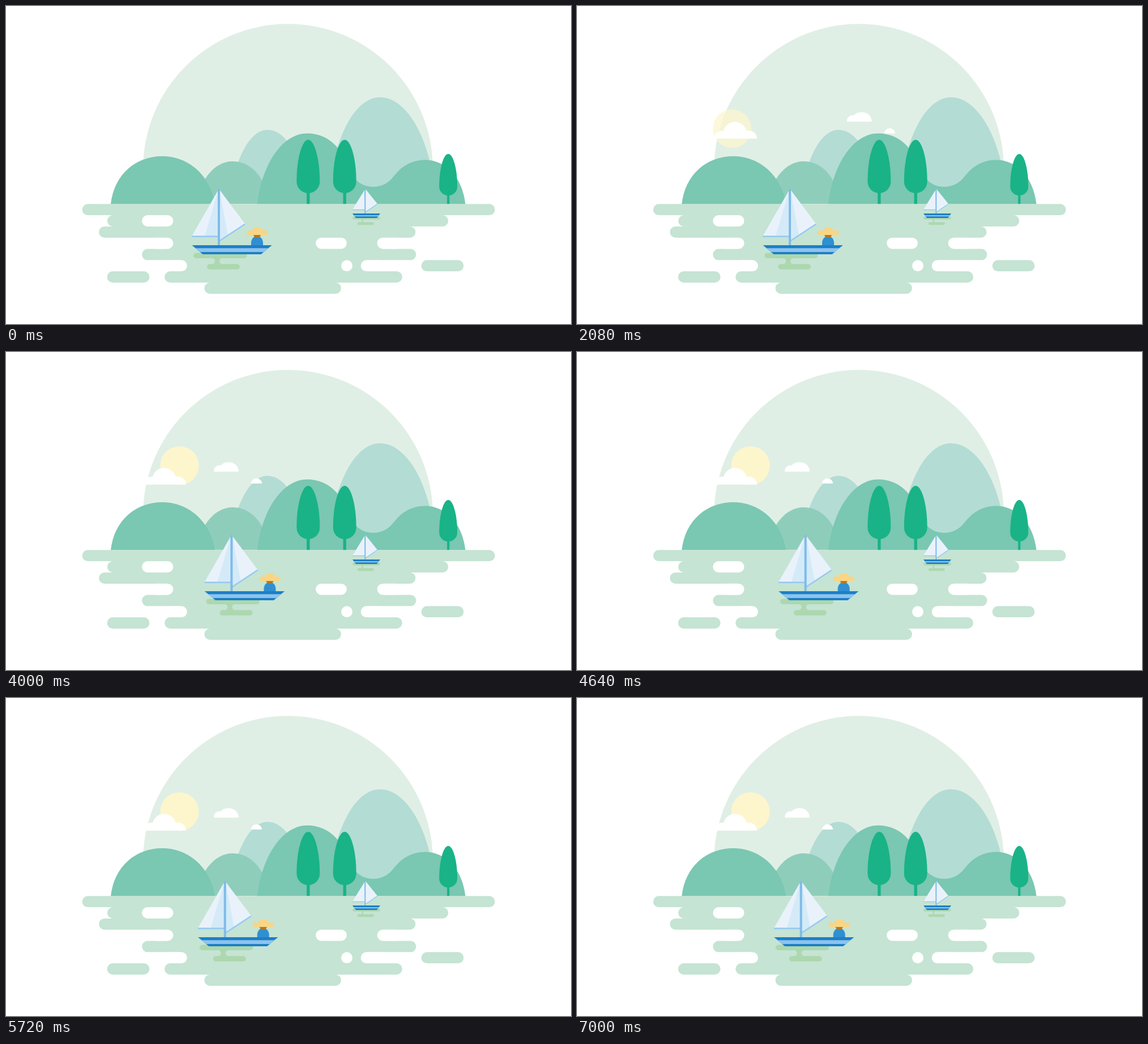
Recreate the animation shown at these times as an HTML page. Size 998 by 561 pixels, loop 7040 ms.

```html
<!DOCTYPE html>
<html lang="en">
<head>
<meta charset="utf-8">
<title>Lake with sailing boats</title>
<style>
  html, body { margin: 0; width: 100%; height: 100%; overflow: hidden; background: #fff; }
  svg { display: block; width: 100vw; height: 100vh; }

  .sun, .sun-fade, .cloud, .drift, .boat { animation: 7040ms -2ms infinite; }
  .sun { animation-name: sun-rise; }
  .sun-fade { animation-name: sun-fade; }
  .cloud { animation-name: cloud-slide; }
  .drift { animation-name: drift; }
  .boat { animation-name: sail; }

  /* Every segment advances in 40 ms steps. */
  @keyframes sun-rise {
    0% { transform: translate(-117.5px, 57.3px); animation-timing-function: steps(72); }
    40.909%, 100% { transform: none; }
  }
  @keyframes sun-fade {
    0%, 12.499% { opacity: 0; }
    12.5% { opacity: .305; animation-timing-function: steps(50); }
    40.909%, 100% { opacity: 1; }
  }
  @keyframes cloud-slide {
    0% { transform: translate(-115px, 30.4px); animation-timing-function: steps(50); }
    28.409%, 100% { transform: none; }
  }
  @keyframes drift {
    0% { transform: translate(395px, -25.6px); animation-timing-function: steps(72); }
    40.909%, 100% { transform: none; }
  }
  @keyframes sail {
    0%, 47.727% { transform: none; animation-timing-function: steps(25); }
    61.932% { transform: translateX(35px); animation-timing-function: steps(1); }
    62.5% { transform: translateX(35.3px); animation-timing-function: steps(26); }
    77.273% { transform: translateX(1.8px); animation-timing-function: steps(26); }
    92.045% { transform: translateX(35px); animation-timing-function: steps(1); }
    92.614% { transform: translateX(35.3px); animation-timing-function: steps(13); }
    100% { transform: translateX(18.3px); }
  }

  .far { fill: #b3dcd5; }
  .hill { fill: #7ac7b2; }
  .water { stroke: #c5e4d4; }
  .gap { stroke: #fff; }
  .water, .gap { fill: none; stroke-width: 19.8; stroke-linecap: round; }
  .ripple { stroke: #add8ae; stroke-linecap: round; }
  .stem { fill: #add8ae; }
  .hull { fill: #1d7fc4; }
  .stripe { fill: #8cc3ef; }
  .mast { fill: #7fbbe9; }
  .sail { fill: #e9f2fb; }
  .fold { fill: #d4eaf8; }
  .boom { fill: none; stroke: #95c8f1; }
</style>
</head>
<body>
<svg viewBox="0 0 998 561" preserveAspectRatio="none">
  <defs>
    <g id="tree" fill="#19b387">
      <path d="M0 0C11.5 0 20.4 36 20.4 71V74A20.4 20 0 0 1-20.4 74V71C-20.4 36-11.5 0 0 0Z"/>
      <path d="M-2.7 90H2.7V113.5H-2.7Z"/>
    </g>
  </defs>

  <path fill="#e0efe5" d="M242 287.5A256 256 0 0 1 754 287.5V349H242Z"/>
  <path class="far" d="M400 310C415 245 440 218.5 461 218.5C478 218.5 490 229 500 243V310Z"/>
  <path class="far" d="M570 310C590 205 625 161 661 161C697 161 733 205 750 280V349H570Z"/>

  <g class="sun"><circle class="sun-fade" cx="306.5" cy="200.4" r="34" fill="#fdf6cd"/></g>
  <path class="cloud" fill="#fff" d="M242 234C242 225 249 219 259 220C262 210 270 204.5 279 204.5C289 204.5 297 211 299.5 220C310 218 318 225 318 234Z"/>
  <path class="drift" fill="#fff" d="M367 211C367 203 373 199 379.5 200C382 196.5 387 194.5 394 194.5C403 194.5 411 201 411 211ZM433 232A9.5 9.3 0 0 1 452 232Z"/>

  <path fill="#8fcdbb" d="M335 349C345 300 372 274 400 274C424 274 444 289 456 315V349Z"/>
  <path class="hill" d="M185 349.5C191 296 230 265 276 265C325 265 362 302 369 349.5Z"/>
  <path class="hill" d="M444 349.5C453 275 490 224.7 532 224.7C552 224.7 570 232 584 248C600 268 607 319 648 319C666 319 677 311 686 299C700 281 719 271.5 740 271.5C775 271.5 806 300 811.5 349.5Z"/>

  <use href="#tree" x="533.8" y="236"/>
  <use href="#tree" x="598.2" y="236"/>
  <use href="#tree" transform="translate(781.2 261) scale(.78)"/>

  <path class="water" d="M144.5 359.2H853.7M188.8 379H771.3M174 398.8H713.5M285 418.6H666M250 438.4H714.5M310 458.2H637M743.5 458.2H798.5M188.5 478H243.5M290 478H690M360.3 497.8H582"/>
  <path class="gap" d="M250 379H285.5M265 418.6H285.5M557 418.6H592M665.5 418.6H690M290 458.2H310M601.9 458.2H602.1M636.5 458.2H660"/>

  <g>
    <path class="ripple" stroke-width="4.8" d="M614.5 374H658.5M623 383.8H647.5"/>
    <path class="stem" d="M626 376a2.6 2.6 0 0 1 0 5.6H633.5a2.6 2.6 0 0 1 0-5.6Z"/>
    <path class="hull" d="M612 366H661L655 374H618Z"/>
    <path class="stripe" d="M614.2 369H658.8L657 371.3H616Z"/>
    <path class="sail" d="M633.7 324L612 359H633.7ZM635 323L656 349L635 363Z"/>
    <path class="boom" stroke-width="1.3" d="M612 359.4H633.5M656 349.2L635 363.6"/>
    <path class="mast" d="M633.3 323H635.3V366H633.3Z"/>
  </g>

  <g class="boat">
    <path class="ripple" stroke-width="9.6" d="M336 440.2H420.7M360 460H408.2"/>
    <path class="stem" d="M364 445a5 5 0 0 1 0 10.2H382a5 5 0 0 1 0-10.2Z"/>
    <path class="hull" d="M328.5 422H469.7L450.5 438H347.5Z"/>
    <path class="stripe" d="M334.5 427.3H463.5L455.3 434H342.8Z"/>
    <path class="sail" d="M375 324.5L328.5 405.5H375ZM377 324L422 384L377 414Z"/>
    <path class="fold" d="M375 325L351 405.5H375ZM377 324L392 404L377 414Z"/>
    <path class="boom" stroke-width="2.4" d="M328.3 406.5H375M422 384.8L377 414.6"/>
    <path class="mast" d="M374 324Q376 322 378 324V422H374Z"/>
    <path fill="#2f8fd1" d="M433 422V418C433 411 437.5 406 443.5 406S454 411 454 418V422Z"/>
    <path fill="#b97717" d="M437 402H450C450 406.500 447.500 409 443.500 409S437 406.500 437 402Z"/>
    <path fill="#f9d584" d="M429 396H436C436 392 439 390 444 390S452 392 452 396H458.500A4 4 0 0 1 458.500 404H429A4 4 0 0 1 429 396Z"/>
  </g>
</svg>
</body>
</html>
```
